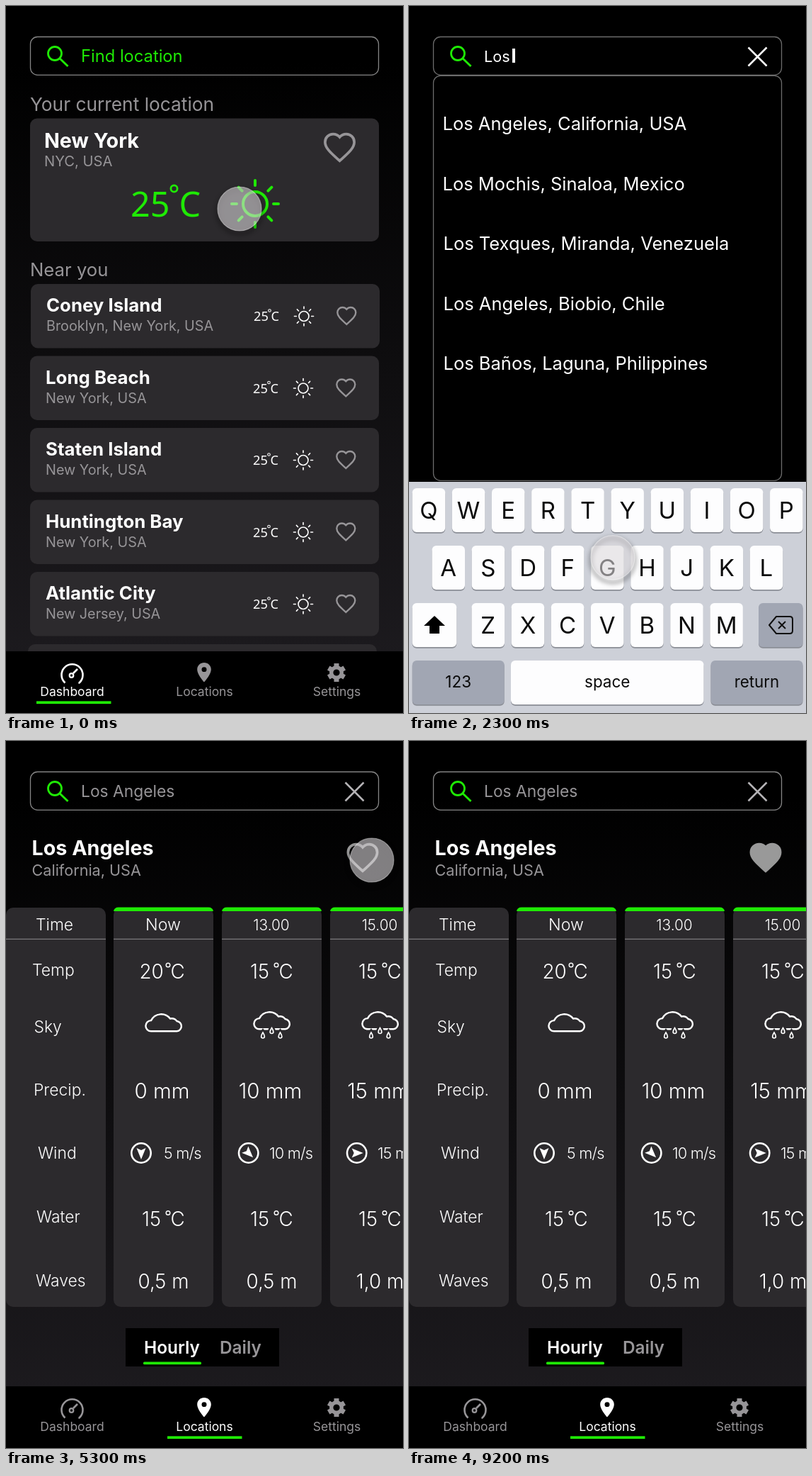
These frames come from a looping animation (561x997 px, 9.3 s). An HTML page:

```html
<!DOCTYPE html>
<html lang="en">
<head>
<meta charset="utf-8">
<style>
  html, body { margin: 0; width: 100%; height: 100%; overflow: hidden; background: #000; }
  svg { display: block; font-family: Inter, sans-serif; }
  text { white-space: pre; }
</style>
</head>
<body>
<svg id="stage" width="561" height="997" viewBox="0 0 561 997"></svg>
<script>
const GREEN = '#1fea05', CARD = '#2c2a2d', GREY = '#979598', WHITE = '#fff';
const DURATION = 9300, STEP = 100;

// --- drawing helpers ---
const text = (x, y, str, size, fill = WHITE, extra = '') =>
  `<text x="${x}" y="${y}" font-size="${size}" fill="${fill}" ${extra}>${str}</text>`;
const MID = 'text-anchor="middle"', BOLD = 'font-weight="700"', SEMI = 'font-weight="600"';
const NOTO = 'font-family="Noto Sans, sans-serif"';
const light = content => `<g font-weight="300">${content}</g>`;
const rect = (x, y, w, h, r, fill, stroke = 'none', extra = '') =>
  `<rect x="${x}" y="${y}" width="${w}" height="${h}" rx="${r}" fill="${fill}" stroke="${stroke}" stroke-width="1.3" ${extra}/>`;
const line = (d, color, width, extra = '') =>
  `<path d="${d}" fill="none" stroke="${color}" stroke-width="${width}" ${extra}/>`;
const ring = (x, y, r, color, width, fill = 'none') =>
  `<circle cx="${x}" cy="${y}" r="${r}" fill="${fill}" stroke="${color}" stroke-width="${width}"/>`;
const at = (x, y, content, scale = 1, angle = 0) =>
  `<g transform="translate(${x} ${y}) rotate(${angle}) scale(${scale})">${content}</g>`;
const group = (id, content) => `<g id="${id}">${content}</g>`;
const range = n => [...Array(n).keys()];

// --- icons ---
const heart = (x, y, scale, id = '') => at(x, y,
  `<path ${id && `id="${id}"`} transform="translate(-12 -12.2)" fill="none" stroke="${GREY}" stroke-width="1.8" d="M12 21.3l-1.5-1.3C5.4 15.4 2 12.3 2 8.5 2 5.4 4.4 3 7.5 3c1.7 0 3.4.8 4.5 2.1C13.1 3.8 14.8 3 16.5 3 19.6 3 22 5.4 22 8.5c0 3.8-3.4 6.9-8.5 11.5z"/>`, scale);
const sun = (x, y, scale, color) => at(x, y, ring(0, 0, 17, color, 4) +
  range(8).map(i => at(0, 0, line('M26 0H33', color, 4, 'stroke-linecap="round"'), 1, i * 45)).join(''), scale);
const magnifier = ring(69, 67, 9.5, GREEN, 2.8) + line('M76 74L87.5 85', GREEN, 3);
const cross = color => line('M479.5 58.5L505.5 84.5M505.5 58.5L479.5 84.5', color, 2.5);
const searchBox = color => rect(34.5, 43.5, 492, 53.8, 10, 'none', color) + magnifier;
const cloud = line('M-18 11.3A7.6 7.6 0 0 1-18-3.9A16 16 0 0 1 9-6.5A9.5 9.5 0 0 1 18.5-3A7.2 7.2 0 0 1 18.5 11.3Z', WHITE, 2.4);
const drop = (x, y) => at(x, y,
  `<path d="M0-5C4 1 3 4 0 4S-4 1 0-5Z" fill="${CARD}" stroke="${CARD}" stroke-width="6"/>` +
  line('M0-4.5C3.5 1 2.8 3.5 0 3.5S-3.5 1 0-4.5Z', WHITE, 1.7));
const rain = cloud + drop(-13, 20.5) + drop(-.5, 14) + drop(11.5, 20.5);
const compass = (x, angle) => ring(x, 581, 13.7, WHITE, 2.6) +
  at(x, 581, `<path d="M0 9L-6.5-7L0-4L6.5-7Z" fill="${WHITE}"/>`, 1, angle);

function nav(active) {
  const tint = i => i === active ? WHITE : GREY;
  const gauge = line('M83.5 954.5A15 15 0 1 1 103.5 954.5Z', tint(0), 2.6, 'stroke-dasharray="73 99"') +
    ring(92.5, 944, 2.8, tint(0), 2.2) + line('M95 941L101 935', tint(0), 2.6);
  const pin = `<path fill="${tint(1)}" fill-rule="evenodd" transform="translate(263.2 923.4) scale(1.4 1.36)" d="M12 2C8.1 2 5 5.1 5 9c0 5.2 7 13 7 13s7-7.8 7-13c0-3.9-3.1-7-7-7zm0 9.5a2.5 2.5 0 1 1 0-5a2.5 2.5 0 0 1 0 5z"/>`;
  const gear = at(467, 940, ring(0, 0, 7.3, tint(2), 5.4) +
    range(6).map(i => at(0, 0, line('M0 8V13', tint(2), 7), 1, i * 60)).join(''));
  const labels = ['Dashboard', 'Locations', 'Settings']
    .map((name, i) => text(93.5 + 187 * i, 972.5, name, 17.5, tint(i), MID)).join('');
  return rect(0, 910, 561, 87, 0, '#000') + gauge + pin + gear + labels +
    rect(active ? 228 : 43, 980.3, 105.5, 3.8, 0, GREEN);
}

// --- screens ---
const backdrop = rect(0, 0, 561, 997, 0, 'url(#shade)');

function nearby([name, region], i) {
  const y = 392 + 101.5 * i, x = i ? 34 : 35;
  return rect(x, y, 493, 90.5, 10, CARD) +
    text(x + 22, y + 39, name, 25.8, WHITE, BOLD) + text(x + 22, y + 66, region, 19.8, GREY) +
    text(x + 315, y + 52, '25', 18.2, WHITE, NOTO) + text(x + 339.5, y + 52, 'C', 18.2, WHITE, NOTO) +
    ring(x + 337.5, y + 37.5, 1.8, WHITE, 1.1) +
    sun(x + 386, y + 45.5, .41, WHITE) + heart(x + 446.3, y + 45, 1.3);
}

const home = backdrop + searchBox('#858585') + text(106, 79, 'Find location', 23.7, GREEN) +
  text(34, 148, 'Your current location', 26.3, GREY) +
  rect(34, 158.5, 493, 173.5, 10, CARD) +
  text(54, 199.5, 'New York', 28.7, WHITE, BOLD) + text(54, 226, 'NYC, USA', 20.2, GREY) +
  heart(471.5, 199.5, 2.06) +
  text(176, 297, '25', 48.5, GREEN, NOTO) + text(244.5, 297, 'C', 48.5, GREEN, NOTO) +
  ring(237.5, 257.5, 4.6, GREEN, 2.8) + sun(352, 279, 1, GREEN) +
  text(34, 381, 'Near you', 25.7, GREY) +
  [['Coney Island', 'Brooklyn, New York, USA'], ['Long Beach', 'New York, USA'],
   ['Staten Island', 'New York, USA'], ['Huntington Bay', 'New York, USA'],
   ['Atlantic City', 'New Jersey, USA']].map(nearby).join('') +
  rect(31, 900, 493, 60, 10, CARD) + nav(0);

const key = (x, y, w, label, size = 33, fill = '#fdfdfe') =>
  rect(x, y + 1.8, w, 62, 6, '#8b8e96') + rect(x, y, w, 62, 6, fill) +
  text(x + w / 2, y + (size > 30 ? 43 : 38), label, size, '#0a0a0a', MID);
const keyRow = (letters, x, y) => [...letters].map((c, i) => key(x + 56.15 * i, y, 46.5, c)).join('');
const DARK_KEY = '#a1a6b3';
const keyboard = rect(0, 671, 561, 326, 0, '#cdd0d8') +
  keyRow('QWERTYUIOP', 4.7, 680) + keyRow('ASDFGHJKL', 32.5, 761) + keyRow('ZXCVBNM', 88.5, 842) +
  key(4.7, 842, 62.5, '') + key(494, 842, 62.5, '', 23, DARK_KEY) +
  key(4.7, 923, 130, '123', 22.5, DARK_KEY) + key(144, 923, 272.5, 'space', 22.5) +
  key(426.5, 923, 130, 'return', 22.3, DARK_KEY) +
  '<path d="M36 860l15 14h-8v11h-14v-11h-8z"/>' +
  line('M519 861h19q4 0 4 4v16q0 4-4 4h-19l-10-12zM522 868l10 10M532 868l-10 10', '#111', 2, 'stroke-linejoin="round"');

const matches = ['Los Angeles, California, USA', 'Los Mochis, Sinaloa, Mexico',
  'Los Texques, Miranda, Venezuela', 'Los Angeles, Biobio, Chile', 'Los Baños, Laguna, Philippines'];
const search = rect(0, 0, 561, 997, 0, '#000') + searchBox('#6c6c6c') +
  rect(34.5, 98.3, 492, 571, 10, 'none', '#6c6c6c') +
  text(106, 79, '', 21.7, WHITE, 'id="query"') + rect(107, 60, 4, 20, 0, WHITE, 'none', 'id="caret"') +
  group('clear', cross(WHITE)) +
  group('empty', text(47.5, 175, 'No recent searches', 25.5)) +
  group('results', matches.map((m, i) => text(i < 2 ? 47.5 : 48.5, 175 + 84.6 * i, m, 25.5)).join('')) + keyboard;

function degrees(cx, y, value) {
  return text(cx - 16.5, y, value, 27.8, WHITE, MID) + ring(cx + 7, y - 18.5, 2.8, WHITE, 1.4) +
    text(cx + 10.5, y, 'C', 27.8);
}
function hour([time, temp, sky, precip, wind, waves], i) {
  const x = 152 + 153 * i, cx = x + 70;
  return rect(x, 235, 141, 563, 10, CARD) +
    `<path d="M${x} 240q1-5.5 7-5.5h127q6 0 7 5.5z" fill="${GREEN}"/>` + line(`M${x} 279.3h141`, '#7b797c', 1.2) +
    text(cx, 267, time, i ? 20.8 : 23.2, WHITE, MID) +
    degrees(cx, 334.5, temp) + at(cx + 1, i ? 395 : 398, sky) +
    text(cx - 1.5, 504, precip, 29.5, WHITE, MID) +
    compass(x + (i ? 37.7 : 39), -45 * i) +
    text(x + (i ? 67 : 71), 589, wind + ' m/s', 21.8, WHITE, 'letter-spacing="-.8"') +
    degrees(cx, 684, '15') + text(cx + .5, 772, waves, 27.8, WHITE, MID);
}

const forecast = rect(0, 235, 141, 563, 10, CARD) + line('M0 279.3h141', '#7b797c', 1.2) +
  [['Time', 42, 267], ['Temp', 37, 330.5], ['Sky', 39.5, 411], ['Precip.', 39, 500], ['Wind', 45, 589],
   ['Water', 43, 678.5], ['Waves', 42, 768.5]].map(([s, x, y]) => text(x, y, s, 22.9)).join('') +
  [['Now', '20', cloud, '0 mm', 5, '0,5 m'], ['13.00', '15', rain, '10 mm', 10, '0,5 m'],
   ['15.00', '15', rain, '15 mm', 15, '1,0 m']].map(hour).join('');

const place = backdrop + searchBox('#858585') + cross('#b5b3b6') +
  text(106, 79, 'Los Angeles', 22.8, GREY) +
  text(36.5, 161, 'Los Angeles', 28.7, WHITE, BOLD) + text(36.5, 190, 'California, USA', 21.6, GREY) +
  heart(504, 164.5, 2.06, 'favorite') + light(forecast) +
  rect(169, 828, 217, 54, 0, '#000') + text(195, 863.5, 'Hourly', 24.4, WHITE, SEMI) +
  text(302, 863.5, 'Daily', 24.4, GREY, SEMI) + rect(194, 875.5, 82, 3.8, 1.5, GREEN) + nav(1);

const dialog = rect(0, 0, 561, 997, 0, '#fff', 'none', 'opacity=".14"') +
  rect(34.5, 216, 492, 249, 8, CARD, GREEN) +
  light(text(280, 280.5, 'Added to favorites. You will find', 26, WHITE, MID) +
    text(280.5, 310.5, 'your favorites on Dashboard.', 25.5, WHITE, MID)) +
  rect(197, 351.3, 166.5, 70.5, 11, '#000', '#6f6d70') + text(280.5, 401.5, 'OK', 43, GREEN, MID + ' ' + BOLD);

const pointer = '<circle cy="4" r="31" fill="none" stroke="#000" stroke-width="4" filter="url(#soft)" opacity=".4"/>' +
  '<circle r="31" fill="#dcdadc" fill-opacity=".58" stroke="#fff" stroke-opacity=".4" stroke-width="1.2"/>';

document.getElementById('stage').innerHTML =
  `<defs><linearGradient id="shade" x2="0" y2="1"><stop offset=".08"/><stop offset=".95" stop-color="#1d1b1f"/></linearGradient>
   <filter id="soft" x="-50%" y="-50%" width="200%" height="200%"><feGaussianBlur stdDeviation="3"/></filter></defs>` +
  group('home', home) + group('search', search) + group('place', place) + group('dialog', dialog) + group('pointer', pointer);

// --- motion ---
const $ = Object.fromEntries([...document.querySelectorAll('[id]')].map(e => [e.id, e]));
const ramp = (t, from, to) => Math.min(1, Math.max(0, (t - from) / (to - from)));

// Eased value along [time, value] stops
function track(t, stops) {
  let value = stops[0][1];
  for (let i = 1; i < stops.length; i++) {
    const u = ramp(t, stops[i - 1][0], stops[i][0]);
    value += (stops[i][1] - stops[i - 1][1]) * u * u * (3 - 2 * u);
  }
  return value;
}
const pathX = [[0, 330], [600, 313], [1200, 313], [1900, 526], [2100, 526], [2386, 222], [3980, 222],
  [5300, 517], [6000, 517], [6001, 330], [6900, 294]];
const pathY = [[0, 286], [600, 64], [1080, 66], [1840, 926], [2100, 926], [2800, 178], [3200, 178],
  [3900, 189], [4200, 189], [5200, 168], [6000, 168], [6001, 500], [6900, 399]];

function show(element, opacity) {
  element.style.opacity = opacity;
  element.style.visibility = opacity > 0 ? 'visible' : 'hidden';
}

function draw(t) {
  const searching = t < 3700 ? ramp(t, 700, 1150) : 0;
  show($.home, t < 1200 ? 1 : 0);
  show($.search, searching);
  show($.place, ramp(t, 3200, 3700));

  const typed = t < 1600 ? 0 : t < 1800 ? 1 : t < 2000 ? 2 : 3;
  $.query.textContent = 'Los'.slice(0, typed);
  $.caret.setAttribute('x', [107, 121, 134, 146][typed]);
  show($.clear, typed ? searching : 0);
  show($.empty, typed ? 0 : searching);
  show($.results, t >= 2100 ? searching : 0);

  const popup = t < 6100 ? 0 : 1 - ramp(t, 7100, 7600);
  show($.dialog, popup);
  $.place.style.filter = popup ? `blur(${popup}px)` : 'none';
  const level = 153 + 26 * popup, tint = `rgb(${level},${level},${level})`;
  $.favorite.setAttribute('fill', t >= 5500 ? tint : 'none');
  $.favorite.setAttribute('stroke', tint);

  $.pointer.setAttribute('transform', `translate(${track(t, pathX)} ${track(t, pathY)})`);
  show($.pointer, t < 6100 ? 1 - ramp(t, 5700, 6000) : ramp(t, 6400, 6700) - ramp(t, 8100, 8400));
}

function tick() {
  draw(Math.floor(performance.now() % DURATION / STEP) * STEP);
  requestAnimationFrame(tick);
}
tick();
</script>
</body>
</html>
```
